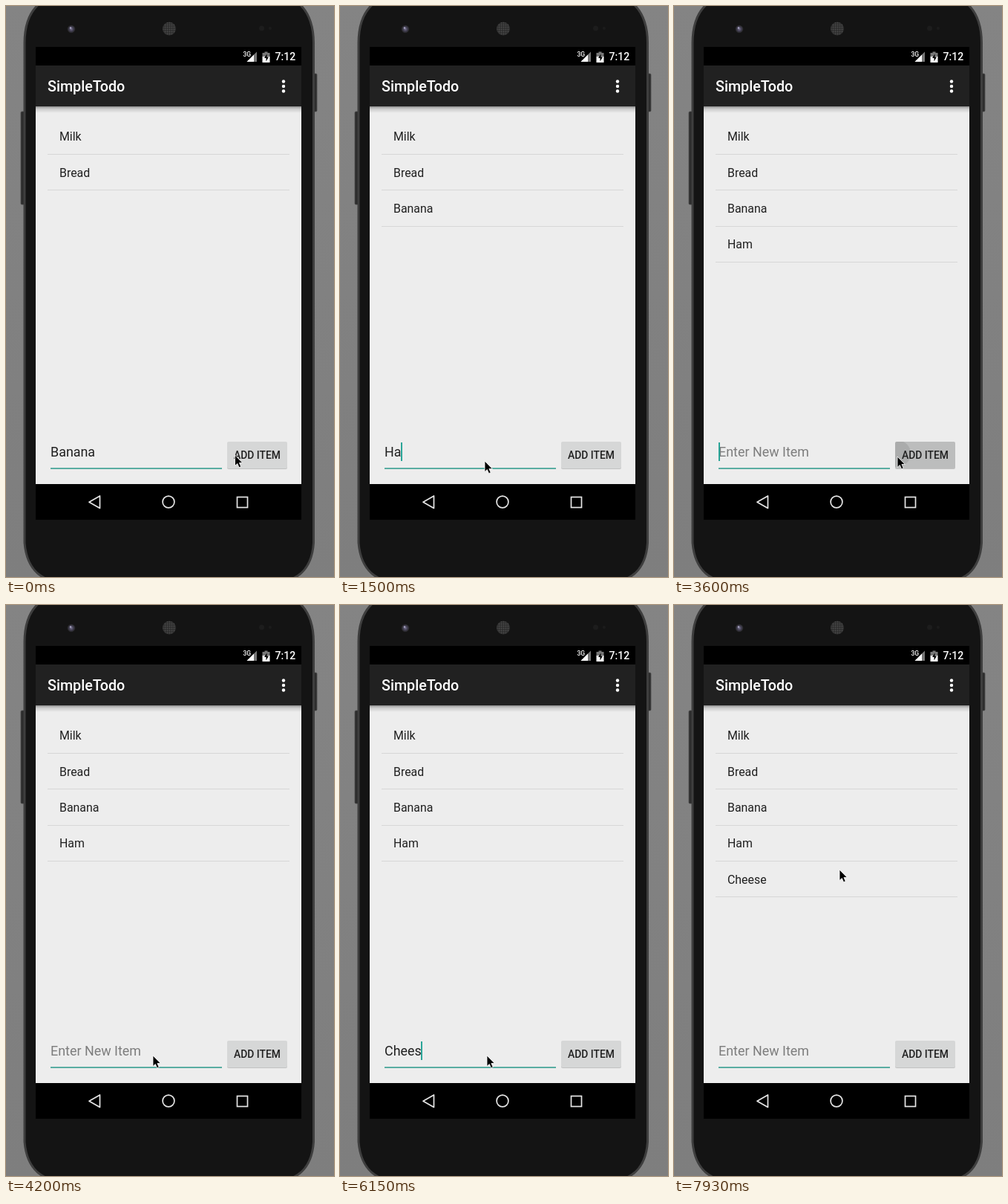
An HTML page for the animation above (8 s loop, 442x768 px).

```html
<!DOCTYPE html>
<html lang="en">
<head>
<meta charset="utf-8">
<title>Todo list</title>
<style>
html, body { margin: 0; width: 100%; height: 100%; overflow: hidden; background: #828282; }
svg { display: block; width: 442px; height: 768px; font-family: Roboto, sans-serif; }
text { white-space: pre; }
.row { font-size: 15.9px; fill: #202020; }
.field { font-size: 17.9px; fill: #202020; }
.medium { font-weight: 500; }
</style>
</head>
<body>
<svg viewBox="0 0 442 768">
  <defs>
    <linearGradient id="wall" x2="0" y2="1">
      <stop stop-color="#848484"/><stop offset="1" stop-color="#7e7e7e"/>
    </linearGradient>
    <linearGradient id="shade" x2="0" y2="1">
      <stop stop-color="#000" stop-opacity=".4"/>
      <stop offset=".35" stop-color="#000" stop-opacity=".15"/>
      <stop offset="1" stop-color="#000" stop-opacity="0"/>
    </linearGradient>
    <radialGradient id="lens">
      <stop stop-color="#77738f"/><stop offset=".5" stop-color="#454255"/><stop offset="1" stop-color="#222"/>
    </radialGradient>
    <pattern id="mesh" width="3" height="3" patternUnits="userSpaceOnUse">
      <rect width="3" height="3" fill="#2c2c2c"/><circle cx="1.5" cy="1.5" r="1" fill="#4b4b4b"/>
    </pattern>
    <clipPath id="buttonClip"><rect x="298" y="586" width="81" height="36" rx="2"/></clipPath>
  </defs>

  <rect width="442" height="768" fill="url(#wall)"/>

  <g id="phone">
    <rect x="20" y="142" width="6" height="125" rx="1.5" fill="#2d2d2d" stroke="#4c4c4c" stroke-width=".8"/>
    <rect x="413" y="91" width="6" height="51" rx="1.5" fill="#2d2d2d" stroke="#4c4c4c" stroke-width=".8"/>
    <path d="M25 50C25 26 31 8 46 -4H394C408 8 414.500 26 414.500 50V722C413 746 404 764 382 772H58C36 764 27 746 25 722Z"
      fill="#141414" stroke="#3e3e3e" stroke-width="3"/>
    <circle cx="88" cy="31" r="5.300" fill="url(#lens)"/>
    <circle cx="87" cy="29.500" r="1.200" fill="#aaa6c4"/>
    <circle cx="220" cy="30.500" r="9" fill="url(#mesh)"/>
    <circle cx="344.500" cy="30" r="3.500" fill="#1d1d1d"/>
    <circle cx="356" cy="30" r="2" fill="#1c1c1c"/>
  </g>

  <rect x="40" y="55" width="358" height="636"/>
  <rect x="40" y="135" width="358" height="508" fill="#ededed"/>
  <rect x="40" y="135" width="358" height="9" fill="url(#shade)"/>
  <rect x="40" y="80" width="358" height="55" fill="#212121"/>

  <g fill="#fff">
    <text class="medium" x="319.500" y="67.500" font-size="8.500">3G</text>
    <path d="M338 61.500V75H324.500Z" fill="#777"/>
    <path d="M334 65.500V75H324.500Z"/>
    <path d="M348.500 61.500h4v1.500h3v5h-10v-5h3z" fill="#777"/>
    <path d="M345.500 68h10v8h-10z"/>
    <path d="M351.500 64.500l-3.500 5.500h2.500v4.500l3.500-6h-2.500z" fill="#000"/>
    <text class="medium" x="362.500" y="73" font-size="14">7:12</text>
    <text class="medium" x="56" y="115" font-size="19.700">SimpleTodo</text>
    <circle cx="374" cy="101.500" r="2.200"/><circle cx="374" cy="108" r="2.200"/><circle cx="374" cy="114.500" r="2.200"/>
  </g>

  <g id="list"></g>

  <rect x="60" y="621" width="231" height="2" fill="#5aada2"/>
  <text id="entry" class="field" x="60" y="606"></text>
  <rect id="caret" y="587" width="2" height="25" fill="#2ba598"/>

  <rect x="298" y="587" width="81" height="36" rx="2" fill="#000" opacity=".18"/>
  <rect x="298" y="586" width="81" height="36" rx="2" fill="#d6d7d7"/>
  <g clip-path="url(#buttonClip)">
    <rect id="press" x="298" y="586" width="81" height="36"/>
    <circle id="ripple"/>
  </g>
  <text class="medium" x="307" y="609" font-size="13.900" fill="#202020">ADD ITEM</text>

  <g fill="none" stroke="#e6e6e6" stroke-width="1.700">
    <path d="M126.500 659V675.500L112 667.200Z" stroke-linejoin="round"/>
    <circle cx="219" cy="667" r="7.900"/>
    <rect x="311.500" y="660.500" width="14" height="14"/>
  </g>

  <path id="mouse" d="M0 0V14.500L3.300 11.500L5.600 16.700L8.200 15.600L5.900 10.500H10.300Z" stroke="#fff" stroke-width=".8"/>
</svg>

<script>
const LOOP = 8000;
const TICK = 149.6;      // the screen refreshes once per tick; all times below are in ticks
const BLINK = 500 / 150; // half a caret blink

const $ = id => document.getElementById(id);
const [list, entry, caret, press, ripple, mouse] =
  ['list', 'entry', 'caret', 'press', 'ripple', 'mouse'].map($);

// One key per tick from start: '.' is a pause, '<' a backspace.
const items = [
  { name: 'Milk', added: -99 },
  { name: 'Bread', added: -99 },
  { name: 'Banana', keys: 'Banana', start: -10, added: 2 },
  { name: 'Ham', keys: 'Ham.s..<', start: 9, added: 24 },
  { name: 'Cheese', keys: 'C....hee.s.e', start: 31.6, added: 48 }
];

const home = { x: 308.5, y: 604 };
const moves = [
  { from: 3.1, to: 6, x: 195, y: 612 },
  { from: 17, to: 20, x: 301, y: 606 },
  { from: 25, to: 28, x: 198, y: 606 },
  { from: 43, to: 46, x: 342.5, y: 616 },
  { from: 49, to: 53, x: 223, y: 356 }
];

const clamp = u => Math.min(1, Math.max(0, u));
const ease = u => u < .5 ? 4 * u ** 3 : 1 - 4 * (1 - u) ** 3;

function set(node, attrs) {
  for (const key in attrs) node.setAttribute(key, attrs[key]);
  return node;
}

function add(parent, tag, attrs) {
  const node = document.createElementNS('http://www.w3.org/2000/svg', tag);
  return parent.appendChild(set(node, attrs));
}

items.forEach((item, i) => {
  item.row = add(list, 'g', {});
  add(item.row, 'text', { class: 'row', x: 72, y: Math.round(181.2 + 48.4 * i) }).textContent = item.name;
  add(item.row, 'rect', { x: 56, y: Math.round(199 + 48.35 * i), width: 326, height: 1, fill: '#d7d7d7' });
});

function pointerAt(now) {
  return moves.reduce((p, m) => {
    const u = ease(clamp((now - m.from) / (m.to - m.from)));
    return { x: p.x + (m.x - p.x) * u, y: p.y + (m.y - p.y) * u };
  }, home);
}

// The text typed so far and the time of the latest edit.
function typedAt(now, lastAdded) {
  const { keys = '', start } = items.find(item => item.added > now) || {};
  let word = '', edited = lastAdded;
  [...keys].forEach((key, k) => {
    if (key === '.' || start + k > now) return;
    word = key === '<' ? word.slice(0, -1) : word + key;
    edited = start + k;
  });
  return { word, edited };
}

function draw(now) {
  const lastAdded = items.findLast(item => item.added <= now).added;
  const { word, edited } = typedAt(now, lastAdded);
  entry.textContent = word || 'Enter New Item';
  entry.style.fill = word ? '' : '#7d7d7d';
  set(caret, {
    x: Math.floor(60 + (word ? entry.getComputedTextLength() : 0)),
    opacity: Math.floor((now - edited) / BLINK) % 2 ? 0 : 1
  });

  for (const { row, added } of items) set(row, { visibility: now < added ? 'hidden' : 'visible' });

  const { x, y } = pointerAt(now);
  set(mouse, { transform: `translate(${x} ${y})` });

  const age = Math.min(3, now - lastAdded);
  const glow = clamp(1 - age / 2.6);
  set(press, { opacity: .12 * glow });
  set(ripple, { cx: x, cy: y - 4, r: 18 * 2 ** age, opacity: .09 * glow });
}

const start = performance.now();
function frame() {
  draw(Math.floor((performance.now() - start) % LOOP / TICK));
  requestAnimationFrame(frame);
}
frame();
</script>
</body>
</html>
```
